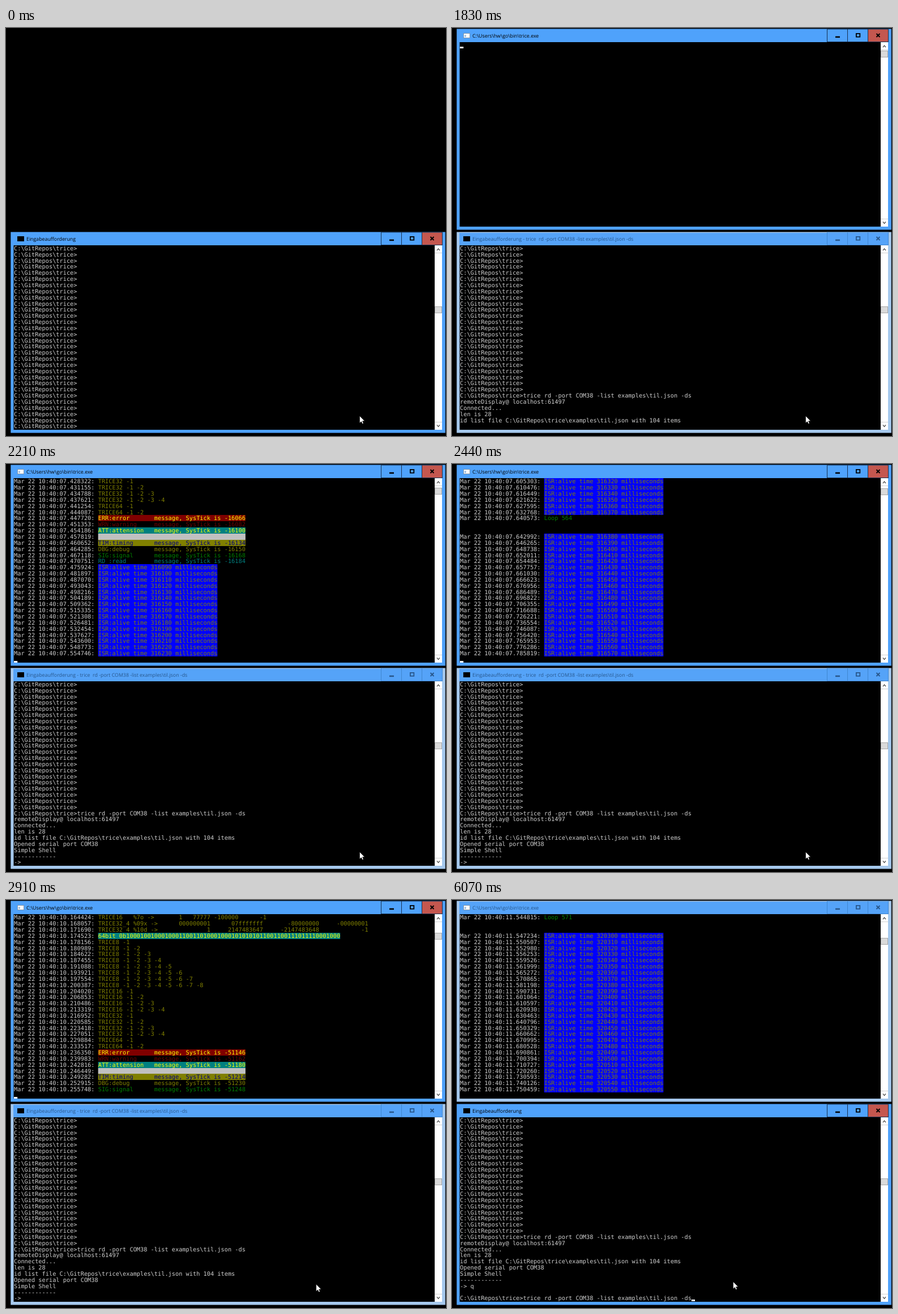
These frames come from a looping animation (777x721 px, 8000 ms). An HTML page with a canvas:

```html
<!DOCTYPE html>
<html lang="de">
<head>
<meta charset="utf-8">
<title>Eingabeaufforderung</title>
<style>
  html, body { margin: 0; width: 100%; height: 100%; overflow: hidden; background: #000; }
  canvas { display: block; }
</style>
</head>
<body>
<canvas id="stage" width="777" height="721"></canvas>
<script>
const ctx = document.getElementById('stage').getContext('2d');

// The screen refreshes in steps: -2 idle, -1 typed, 0 to QUIT running, RETYPE at the end
const LOOP = 8000, STEP = 78.5;
const OPEN = 2, QUIT = 20, RETYPE = 21;

const CELL = 6.195, LINE = 10.845, LEFT = 14;
const MONO = '10.29px "DejaVu Sans Mono", monospace';
const SANS = '8.8px "Open Sans", "Noto Sans", sans-serif';

// Text styles: foreground, background
const STYLES = {
  plain: ['#d0d0d0'],
  isr: ['#808000', '#0000ff'],
  time: ['#000080', '#808000'],
  teal: ['#008080'],
  olive: ['#808000'],
  green: ['#008000'],
  purple: ['#800080'],
  note: ['#ffff00', '#008000'],
  err: ['#ffff00', '#800000'],
  warn: ['#700000'],
  att: ['#ffff00', '#008080'],
  dia: ['#c0c0c0', '#c0c0c0']
};

const list = (n, fn) => Array.from({ length: n }, (_, i) => fn(i));
const clamp = (v, lo, hi) => Math.min(hi, Math.max(lo, v));

// ---- Log content: a row is a list of [style, text]; null is an empty row ----
const row = (style, text) => [[style, text]];

const table = (head, ends, values) => row('olive', values.split(' ').reduce(
  (text, v, i) => text + v.padStart(ends(i) - text.length), head));

function numbers() {
  const e8 = i => 20 + 5 * i, e16 = i => 24 + 8 * i, e32 = i => 32 + 15 * i + (i === 2);
  return [
    table('TRICE8  %03x ->', e8, '001 07f -80 -01'),
    table('TRICE8   %4d ->', e8, '1 127 -128 -1'),
    table('TRICE8   %4o ->', e8, '1 177 -200 -1'),
    table('TRICE16  %05x ->', e16, '00001 07fff -8000 -0001'),
    table('TRICE16   %6d ->', e16, '1 32767 -32768 -1'),
    table('TRICE16   %7o ->', e16, '1 77777 -100000 -1'),
    table('TRICE32_4 %09x ->', e32, '000000001 07fffffff -80000000 -00000001'),
    table('TRICE32_4 %10d ->', e32, '1 2147483647 -2147483648 -1'),
    row('att', '64bit 0b' + 0x1122334455667788n.toString(2))
  ];
}

const counts = (bits, n) =>
  list(n, i => row('olive', `TRICE${bits}` + list(i + 1, k => ` -${k + 1}`).join('')));

const levels = tick => [
  ['err', 'ERR:error'], ['warn', 'WRN:warning'], ['att', 'ATT:attension'],
  ['dia', 'DIA:diagnostics'], ['time', 'TIM:timing'], ['olive', 'DBG:debug'],
  ['green', 'SIG:signal'], ['teal', 'RD_:read']
].map(([style, name], i) =>
  row(style, `${name.padEnd(16)}message, SysTick is ${tick - 17 * i + i % 2}`));

function demo(tick, ms) {
  const rule = row('plain', '-'.repeat(90));
  return [
    row('time', `timing      message, SysTick is ${tick} @ ${ms} ms`),
    row('plain', 'Hello world this is a 1st printf replacement.'),
    row('teal', '12345 as 16bit is 0b0011000000111001'),
    rule, null,
    [['note', 'This ASSERT error is just a demo and no real error: '],
     ['purple', 'triceCheck.c'], ['green', ' line 27 '], ['err', 'ERR:ASSERT failed']],
    rule, null,
    ...numbers(),
    ...counts(8, 8), ...counts(16, 4), ...counts(32, 4), ...counts(64, 2)
  ];
}

// ---- Log timing: each row comes one pace after the last, but not before it is due ----
const log = [];
let now = 7247.8;

// Device milliseconds to milliseconds after 10:40:00
const wall = ms => 7786.2 + (ms - 316570) * 0.996;

function stamp(t) {
  const jitter = (log.length * 373) % 800 - 400;
  const clock = (t / 1000 + jitter / 1e6).toFixed(6).padStart(9, '0');
  return ['plain', `Mar 22 10:40:${clock}: `];
}

function emit(rows, pace, due = () => 0) {
  rows.forEach((r, i) => {
    if (r) now = Math.max(now + pace, due(i));
    log.push({ t: now, runs: r ? [stamp(now), ...r] : [] });
  });
}

const alive = (first, n, pace) => emit(
  list(n, i => row('isr', `ISR:alive time ${first + 10 * i} milliseconds`)),
  pace, i => wall(first + 10 * i));

emit([19, 137, 96].map(b => row('plain', `dicarding byte 0x${b.toString(16)} (dez ${b})`)), 2.9);
alive(316030, 6, 2.9);
for (let n = 0; n < 8; n++) {
  const ms = 316088 + 560 * n, next = 316380 + 560 * n;
  const tick = -23082 - 7016 * (n - 1);
  emit(demo((35130 + 58520 * n) % 65536, ms), 3.26, i => i ? 0 : wall(ms) + 34);
  emit(levels(tick), 3.26);
  alive(ms + 2, 29, 5.6);
  emit([row('green', `Loop ${564 + n}`), null, null], 2.9, () => wall(next) + 43.4);
  alive(next, 27, 2.9);
}

const CLOCK = [[0, 6854], [7, 7403.7], [12, 7787], [15, 8020], [QUIT, 11751]];

function clock(k) {
  const i = Math.max(1, CLOCK.findIndex(([step]) => k <= step));
  const [k0, t0] = CLOCK[i - 1], [k1, t1] = CLOCK[i];
  return t0 + (t1 - t0) * (k - k0) / (k1 - k0);
}

// ---- Shell content ----
const PROMPT = 'C:\\GitRepos\\trice>';
const CMD = 'trice rd -port COM38 -list examples\\til.json -ds';
const OUT = ['remoteDisplay@ localhost:61497', 'Connected...', 'len is 28',
  'id list file C:\\GitRepos\\trice\\examples\\til.json with 104 items',
  'Opened serial port COM38', 'Simple Shell', '------------', '->'];

function shellRows(k) {
  const rows = Array(30).fill(PROMPT);
  if (k > -2) rows.push(PROMPT + CMD);
  if (k >= QUIT) {
    rows.push(...OUT.slice(0, 7), '-> q', '', PROMPT + (k === RETYPE ? CMD : ''));
  } else if (k >= 0) {
    const n = clamp(2 * (k - OPEN), 0, OUT.length);
    rows.push(...OUT.slice(0, n));
    if (n < OUT.length) rows.push('');
  }
  return rows.slice(-30);
}

// ---- Drawing ----
function rect(x, y, w, h, color) {
  ctx.fillStyle = color;
  ctx.fillRect(x, y, w, h);
}

function path(points, color, width) {
  ctx.beginPath();
  points.forEach(([x, y]) => ctx.lineTo(x, y));
  ctx.strokeStyle = color;
  ctx.lineWidth = width;
  ctx.stroke();
}

const rowTop = (y, r) => y + r * LINE;

function drawRow(y, r, runs) {
  const top = Math.round(rowTop(y, r)), next = Math.round(rowTop(y, r + 1));
  const base = Math.round(rowTop(y, r) + 9);
  let col = 0;
  ctx.font = MONO;
  for (const [style, text] of runs) {
    const [fg, bg] = STYLES[style];
    if (bg) rect(LEFT + col * CELL, top, text.length * CELL, next - top, bg);
    ctx.fillStyle = fg;
    for (const ch of text) {
      if (ch !== ' ') ctx.fillText(ch, LEFT + col * CELL, base);
      col++;
    }
  }
}

const caret = (y, r, col) =>
  rect(LEFT + col * CELL, Math.round(rowTop(y, r)) + 8, CELL, 3, '#fff');

function drawButtons(y, active) {
  const ink = active ? '#000' : '#28578c';
  if (active) rect(735, y, 35, 23, '#c4574f');
  ctx.strokeStyle = active ? '#17304f' : '#3f86d0';
  ctx.lineWidth = 1;
  for (const x of [662.5, 698.5, 734.5]) ctx.strokeRect(x, y, 36, 22.5);
  rect(677, y + 12.6, 8, 2.6, ink);
  ctx.strokeStyle = ink;
  ctx.lineWidth = 1.8;
  ctx.strokeRect(713.9, y + 7.9, 6.4, 5.8);
  path([[749.5, y + 8], [755.5, y + 14]], ink, 1.9);
  path([[755.5, y + 8], [749.5, y + 14]], ink, 1.9);
}

function drawScrollbar(y, thumb) {
  rect(757, y + 23, 13, 326, '#fff');
  rect(757, y + 36, 13, 1, '#d4d4d4');
  rect(757, y + 335, 13, 1, '#d4d4d4');
  path([[761, y + 32], [763.5, y + 29], [766, y + 32]], '#505050', 1.2);
  path([[761, y + 340.5], [763.5, y + 343.5], [766, y + 340.5]], '#505050', 1.2);
  rect(757, thumb, 13, 12, '#a8a8a8');
  rect(758, thumb + 1, 11, 10, '#dadada');
}

function drawIcon(y, shell) {
  if (shell) return rect(20, y + 7, 12, 9, '#000');
  rect(20, y + 7, 12, 9, '#7d94ad');
  rect(21, y + 8, 10, 7, '#fff');
  rect(22, y + 10, 3, 4, '#a9c4e2');
}

function drawWindow(y, title, active, thumb, shell) {
  rect(8.3, y - 0.5, 767.5, 355, active ? '#4fa2fb' : '#a6c9ee');
  if (!active) rect(13, y + 1, 758, 22, '#55a3f8');
  rect(13.5, y + 23, 743.5, 326, '#000');
  drawButtons(y, active);
  drawScrollbar(y, thumb);
  drawIcon(y, shell);
  ctx.font = SANS;
  ctx.fillStyle = active ? '#000' : '#28578c';
  ctx.fillText(title, 36, y + 15);
}

function drawPointer(x, y) {
  const shape = [[0, 0], [0, 12.6], [2.9, 10], [4.8, 14], [6.8, 13.1], [5, 9.2], [8.8, 9]];
  ctx.beginPath();
  shape.forEach(([dx, dy]) => ctx.lineTo(x + dx, y + dy));
  ctx.closePath();
  ctx.fillStyle = '#fff';
  ctx.fill();
  ctx.strokeStyle = '#000';
  ctx.lineWidth = 0.6;
  ctx.stroke();
}

function drawLogWindow(k) {
  const running = k < QUIT, top = 25.4;
  const time = clock(Math.min(k, QUIT));
  const shown = log.filter(e => e.t <= time), page = shown.slice(-29);
  const thumb = Math.round(40 + shown.length / 31);
  drawWindow(2, 'C:\\Users\\hw\\go\\bin\\trice.exe', running, thumb, false);
  page.forEach((e, r) => drawRow(top, r, e.runs));
  if (running) caret(top, page.length, 0);
}

function drawShellWindow(k) {
  const top = 383.9, active = k < OPEN || k >= QUIT;
  const rows = shellRows(k);
  const task = k > 0 && k < QUIT ? ` - ${CMD.replace(' ', '  ')}` : '';
  drawWindow(361, 'Eingabeaufforderung' + task, active, 492, true);
  rows.forEach((text, r) => drawRow(top, r, row('plain', text)));
  if ((k > -2 && k < OPEN) || k === RETYPE) caret(top, 29, rows[29].length);
}

function draw(k) {
  ctx.textRendering = 'geometricPrecision';
  rect(0, 0, 777, 721, '#000');
  if (k >= OPEN) drawLogWindow(k);
  drawShellWindow(k);
  const p = clamp((k - 15) / (QUIT - 15), 0, 1);
  drawPointer(624.5 - 128 * p, 685.5 - 11 * p);
}

function stepAt(t) {
  if (t < 500) return -2;
  if (t < 1500) return -1;
  if (t >= 6070) return RETYPE;
  return clamp(Math.floor((t - 1495) / STEP), 0, QUIT);
}

const start = performance.now();
let current;

function tick() {
  const k = stepAt((performance.now() - start) % LOOP);
  if (k !== current) draw(current = k);
  requestAnimationFrame(tick);
}
tick();
</script>
</body>
</html>
```
